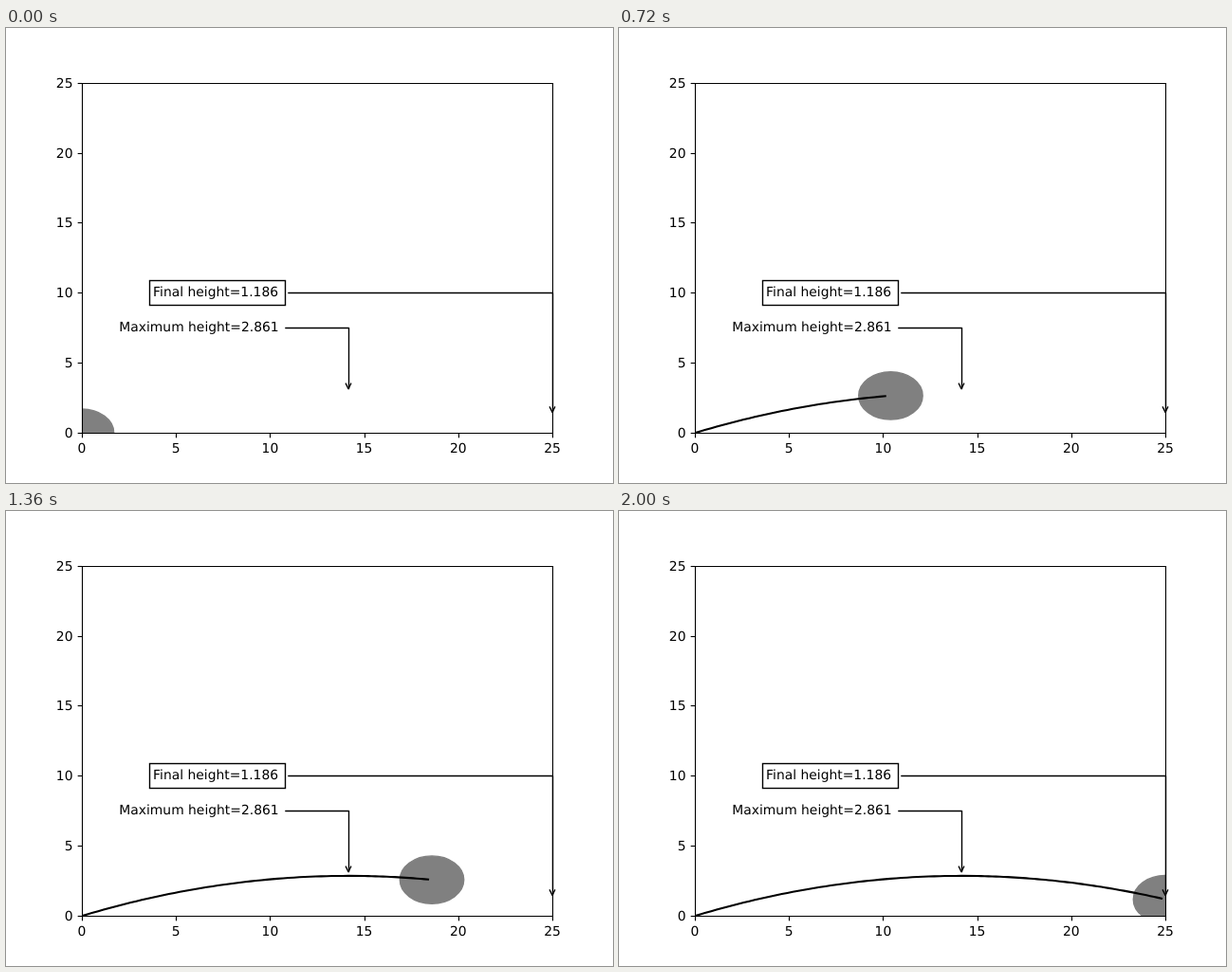
These frames come from a looping animation (640x480 px, 2.02 s). An HTML page with a canvas:

```html
<!DOCTYPE html>
<html>
<head>
<meta charset="utf-8">
<style>
html, body { margin: 0; width: 100%; height: 100%; overflow: hidden; background: #fff; }
canvas { display: block; width: 640px; height: 480px; }
</style>
</head>
<body>
<canvas id="stage" width="640" height="480"></canvas>
<script>
const ctx = document.getElementById("stage").getContext("2d");
const STEP = 20, COUNT = 101, HALF = 50;
const LEFT = 80, RIGHT = 576, TOP = 57.6, BOTTOM = 427.2;
const UX = (RIGHT - LEFT) / 25, UY = (BOTTOM - TOP) / 25;
const PT = 100 / 72;
const PEAK_X = 14.163, PEAK_Y = 2.861, RADIUS = 1.7;

const px = x => LEFT + x * UX;
const py = y => BOTTOM - y * UY;
const snap = v => Math.floor(v + 0.5) + 0.5;

// Even steps up to the peak, then even steps from 15 to 25.
const xAt = i => i < HALF ? PEAK_X * i / (HALF - 1) : 15 + 0.2 * (i - HALF);
const yAt = x => PEAK_Y * (1 - ((x - PEAK_X) / PEAK_X) ** 2);

function path(points, width, cap, join) {
  ctx.lineWidth = width;
  ctx.lineCap = cap;
  ctx.lineJoin = join;
  ctx.beginPath();
  for (const [x, y] of points) ctx.lineTo(x, y);
  ctx.stroke();
}

function text(str, x, y, align) {
  ctx.textAlign = align;
  ctx.fillText(str, x, y);
}

function drawBall(i) {
  const x = xAt(i);
  ctx.beginPath();
  ctx.ellipse(px(x), py(yAt(x)), RADIUS * UX, RADIUS * UY, 0, 0, Math.PI * 2);
  ctx.fillStyle = ctx.strokeStyle = "#808080";
  ctx.lineWidth = PT;
  ctx.fill();
  ctx.stroke();
}

function drawTrail(i) {
  const points = [];
  for (let k = 0; k < i; k++) points.push([px(xAt(k)), py(yAt(xAt(k)))]);
  if (points.length > 1) path(points, 1.5 * PT, "square", "round");
}

function drawAxes() {
  const w = 0.8 * PT, len = 3.5 * PT;
  const l = snap(LEFT), r = snap(RIGHT), t = snap(TOP), b = snap(BOTTOM);
  for (let v = 0; v <= 25; v += 5) {
    const x = snap(px(v)), y = snap(py(v));
    path([[x, b], [x, b + len]], w, "butt", "miter");
    path([[l, y], [l - len, y]], w, "butt", "miter");
    text(v, px(v), 448, "center");
    text(v, 70.5, Math.round(py(v) + 5), "right");
  }
  path([[l, t], [l, b]], w, "square", "miter");
  path([[r, t], [r, b]], w, "square", "miter");
  path([[l, b], [r, b]], w, "square", "miter");
  path([[l, t], [r, t]], w, "square", "miter");
}

function drawArrow(startX, lineY, x, y) {
  const tip = py(y) - 2 * PT - 1.55;
  const cx = px(x), sx = snap(cx), sy = snap(py(lineY));
  path([[startX, sy], [sx, sy], [sx, tip]], PT, "round", "round");
  path([[cx - 2 * PT, tip - 4 * PT], [cx, tip], [cx + 2 * PT, tip - 4 * PT]], PT, "round", "round");
}

function drawNotes() {
  drawArrow(294.8, 7.5, PEAK_X, PEAK_Y);
  text("Maximum height=2.861", 119.3, 320, "left");
  drawArrow(297.8, 10, 25, yAt(25));
  ctx.fillStyle = "#fff";
  ctx.fillRect(151.5, 266.5, 143, 26);
  ctx.lineWidth = PT;
  ctx.lineJoin = "miter";
  ctx.strokeRect(151.5, 266.5, 143, 26);
  ctx.fillStyle = "#000";
  text("Final height=1.186", 155.1, 283, "left");
}

function draw(i) {
  ctx.fillStyle = "#fff";
  ctx.fillRect(0, 0, 640, 480);
  ctx.save();
  ctx.beginPath();
  ctx.rect(LEFT, TOP, RIGHT - LEFT, BOTTOM - TOP);
  ctx.clip();
  drawBall(i);
  ctx.strokeStyle = "#000";
  drawTrail(i);
  ctx.restore();

  ctx.fillStyle = ctx.strokeStyle = "#000";
  ctx.font = 10 * PT + 'px "DejaVu Sans", sans-serif';
  ctx.textRendering = "geometricPrecision";
  drawAxes();
  drawNotes();
}

const start = performance.now();
function tick() {
  const t = Math.max(0, performance.now() - start);
  draw(Math.floor(t / STEP) % COUNT);
  requestAnimationFrame(tick);
}
tick();
</script>
</body>
</html>
```
